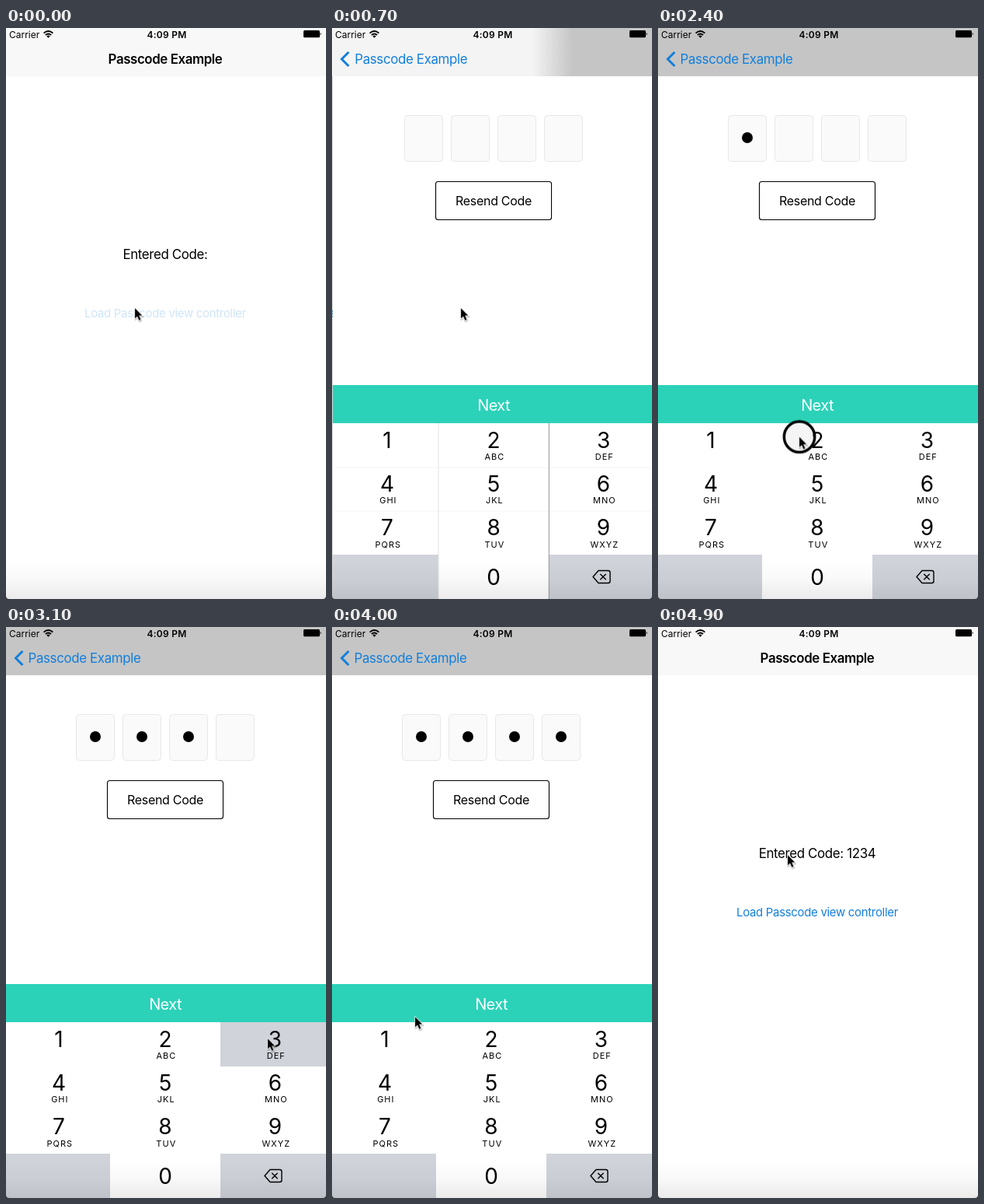
Animation, 412 px wide and 734 px high, one loop 5000 ms. Source, as an HTML page:

```html
<!DOCTYPE html>
<html lang="en">
<head>
<meta charset="utf-8">
<title>Passcode Example</title>
<style>
  html, body { margin: 0; width: 100%; height: 100%; overflow: hidden; background: #fff; }
  svg { display: block; width: 412px; height: 734px; }
  text { font-family: Inter, Roboto, "Liberation Sans", sans-serif; }
  .mid { text-anchor: middle; }
  .body { font-size: 16.9px; letter-spacing: -.36px; }
  .title { font-size: 16.9px; font-weight: 600; letter-spacing: -.42px; }
  .blue { fill: #127fdc; }
  .link { font-size: 14.9px; letter-spacing: -.27px; }
  .num { font-size: 28px; }
  .abc { font-size: 11px; letter-spacing: 1px; }

  /* Push and pop share one eased track */
  .view, .home, .strip, .dim, .old, .oldmove, .new, .newmove {
    animation: 5s cubic-bezier(.16, 1, .3, 1) infinite;
  }
  .view { animation-name: view; }
  .home { animation-name: home; }
  .strip { animation-name: strip; }
  .dim { animation-name: dim; }
  .old { animation-name: fade-out; }
  .oldmove { animation-name: old-move; }
  .new { animation-name: fade-in; }
  .newmove { animation-name: new-move; }
  @keyframes view { 0%, 2.6%, 99.4%, 100% { transform: translateX(422px); } 20.1%, 84.2% { transform: none; } }
  @keyframes home { 0%, 2.6%, 99.4%, 100% { transform: none; } 20.1%, 84.2% { transform: translateX(-123.6px); } }
  @keyframes strip {
    0%, 2.6%, 99.4%, 100% { transform: none; fill: #f8f8f8; }
    20.1%, 84.2% { transform: translateX(-155px); fill: #f4f4f4; }
  }
  @keyframes dim { 0%, 2.6%, 99.4%, 100% { opacity: 0; } 20.1%, 84.2% { opacity: .1; } }
  @keyframes fade-out { 0%, 2.6%, 99.4%, 100% { opacity: 1; } 20.1%, 84.2% { opacity: 0; } }
  @keyframes fade-in { 0%, 2.6%, 99.4%, 100% { opacity: 0; } 20.1%, 84.2% { opacity: 1; } }
  @keyframes old-move { 0%, 2.6%, 99.4%, 100% { transform: none; } 20.1%, 84.2% { transform: translateX(-104.5px); } }
  @keyframes new-move { 0%, 2.6%, 99.4%, 100% { transform: translateX(104.5px); } 20.1%, 84.2% { transform: none; } }

  .press { animation: press 5s linear infinite; }
  @keyframes press { 0%, 2% { opacity: .2; } 7%, 100% { opacity: 1; } }

  /* Hard switches */
  .sw { animation: 5s step-end infinite; }
  .moving { animation-name: moving; }
  .before { animation-name: before; }
  .after { animation-name: after; }
  @keyframes moving { 0%, 84.2%, 100% { opacity: 1; } 16% { opacity: 0; } }
  @keyframes before { 0% { opacity: 1; } 84%, 100% { opacity: 0; } }
  @keyframes after { 0% { opacity: 0; } 84%, 100% { opacity: 1; } }
  .d1 { animation-name: d1; }
  .d2 { animation-name: d2; }
  .d3 { animation-name: d3; }
  .d4 { animation-name: d4; }
  @keyframes d1 { 0% { opacity: 0; } 39.6%, 100% { opacity: 1; } }
  @keyframes d2 { 0% { opacity: 0; } 49.6%, 100% { opacity: 1; } }
  @keyframes d3 { 0% { opacity: 0; } 61.6%, 100% { opacity: 1; } }
  @keyframes d4 { 0% { opacity: 0; } 73.6%, 100% { opacity: 1; } }
  .k1 { animation-name: k1; }
  .k2 { animation-name: k2; }
  .k3 { animation-name: k3; }
  .k4 { animation-name: k4; }
  @keyframes k1 { 0%, 42.4%, 100% { opacity: 0; } 39.6% { opacity: 1; } }
  @keyframes k2 { 0%, 52.8%, 100% { opacity: 0; } 49.6% { opacity: 1; } }
  @keyframes k3 { 0%, 64.4%, 100% { opacity: 0; } 61.6% { opacity: 1; } }
  @keyframes k4 { 0%, 73.6%, 100% { opacity: 0; } 71.6% { opacity: 1; } }
  .ring { animation-name: ring; }
  @keyframes ring {
    0%, 39.6%, 49.6%, 61.6%, 71.6%, 83.6%, 100% { opacity: 0; }
    37.6%, 47.6%, 59.6%, 69.6%, 81.6% { opacity: 1; }
  }

  .cursor { animation: cursor 5s ease-in-out infinite; }
  @keyframes cursor {
    0%, 20% { transform: translate(166px, 360px); }
    31%, 33% { transform: translate(125px, 535px); }
    38%, 41% { transform: translate(120px, 533px); }
    48% { transform: translate(182px, 525.5px); }
    50% { transform: translate(185px, 526px); }
    60% { transform: translate(350px, 530px); }
    62% { transform: translate(337px, 529px); }
    70%, 72% { transform: translate(72px, 605px); }
    80% { transform: translate(107px, 501px); }
    84% { transform: translate(112px, 488px); }
    95%, 100% { transform: translate(167px, 293px); }
  }
</style>
</head>
<body>
<svg viewBox="0 0 412 734">
  <defs>
    <linearGradient id="edge">
      <stop offset="0" stop-color="#f4f4f4"/>
      <stop offset="1" stop-color="#f4f4f4" stop-opacity="0"/>
    </linearGradient>
    <linearGradient id="side">
      <stop offset="0" stop-opacity="0"/>
      <stop offset="1" stop-opacity=".12"/>
    </linearGradient>
    <linearGradient id="foot" x2="0" y2="1">
      <stop offset="0" stop-opacity="0"/>
      <stop offset=".5" stop-opacity=".025"/>
      <stop offset="1" stop-opacity=".08"/>
    </linearGradient>
  </defs>

  <rect width="412" height="734" fill="#fff"/>

  <g class="home">
    <text class="mid body sw before" x="205" y="297">Entered Code:</text>
    <text class="mid body sw after" x="205" y="297">Entered Code: 1234</text>
    <text class="mid link blue press" x="205" y="371.5">Load Passcode view controller</text>
    <rect class="dim" y="62" width="412" height="672"/>
  </g>

  <g class="view">
    <rect x="-10" y="62" width="8" height="672" fill="url(#side)"/>
    <rect x="-2" y="62" width="414" height="672" fill="#fff"/>
    <g id="boxes"></g>
    <rect x="130.5" y="197.5" width="149" height="49" rx="3" fill="#fff" stroke="#000" stroke-width="1.1"/>
    <text class="mid" x="205" y="227.5" font-size="16" letter-spacing="-.3">Resend Code</text>
    <rect x="-2" y="459" width="414" height="49" fill="#2bd2b8"/>
    <text class="mid" x="205" y="491.5" font-size="20" letter-spacing="-.6" fill="#fff">Next</text>

    <g fill="#d0d3da">
      <rect x="-2" y="677" width="136" height="57"/>
      <rect x="276" y="677" width="136" height="57"/>
      <rect class="sw k1" y="508" width="134" height="57"/>
      <rect class="sw k2" x="134" y="508" width="142" height="57"/>
      <rect class="sw k3" x="276" y="508" width="136" height="57"/>
      <rect class="sw k4" y="565" width="134" height="56"/>
    </g>
    <g class="sw moving" fill="none">
      <path d="M0 565H412M0 621H412" stroke="#f4f4f4"/>
      <path d="M134 508V734" stroke="#e2e2e2"/>
      <path d="M276.3 508V734" stroke="#919296"/>
    </g>
    <g id="keys"></g>
    <g fill="none" stroke="#000" stroke-width="1.4" stroke-linejoin="round" stroke-linecap="round">
      <path d="M340 697.5H352.5Q355 697.5 355 700V711Q355 713.5 352.5 713.5H340L333 705.5Z"/>
      <path d="M342.7 702.2L349.3 708.8M349.3 702.2L342.7 708.8"/>
    </g>
  </g>

  <rect width="412" height="62" fill="#c5c5c5"/>
  <g class="sw moving">
    <g class="strip">
      <rect width="412.5" height="62"/>
      <rect x="412" width="52" height="62" fill="url(#edge)"/>
    </g>
  </g>

  <g class="old"><text class="mid title oldmove" x="205" y="46">Passcode Example</text></g>
  <g class="new">
    <path d="M21.5 31L12.5 40L21.5 49" fill="none" stroke="#127fdc" stroke-width="3"/>
    <text class="body blue newmove" x="28.5" y="46">Passcode Example</text>
  </g>

  <text x="4" y="13" font-size="12">Carrier</text>
  <g fill="none" stroke="#000" stroke-width="1.9">
    <path d="M48.6 6.6Q54.5 1.4 60.4 6.6"/>
    <path d="M50.9 9Q54.5 5.9 58.1 9"/>
  </g>
  <path d="M52.3 10.4Q54.5 8.7 56.7 10.4L54.5 12.8Z"/>
  <text class="mid" x="207" y="13" font-size="12" font-weight="600" letter-spacing=".25">4:09 PM</text>
  <rect x="383" y="3" width="21" height="9.3" rx="1.6"/>
  <path d="M404.7 6Q406.7 7.7 404.7 9.4Z"/>

  <rect y="684" width="412" height="50" fill="url(#foot)"/>
  <path d="M0 729.5Q0 734 4.5 734H0ZM412 729.5Q412 734 407.5 734H412Z" fill="#333"/>

  <g class="cursor">
    <circle class="sw ring" r="19.7" fill="#eee" fill-opacity=".6" stroke="#000" stroke-width="3.5"/>
    <g stroke-linejoin="round" transform="scale(.9)">
      <path d="M.6 1.5V16.5L4 13.6L6.6 19.3L9.2 18L6.6 12.6H11.4Z" opacity=".18" stroke="#000" stroke-width="2.6"/>
      <path d="M0 0V14.8L3.4 11.7L6 17.5L8.3 16.4L5.8 10.8H10.3Z" stroke="#fff" stroke-width="1.6" paint-order="stroke"/>
    </g>
  </g>
</svg>
<script>
  const cols = [68, 205, 346.5];
  const letters = ["", "ABC", "DEF", "GHI", "JKL", "MNO", "PQRS", "TUV", "WXYZ"];
  const digit = (x, y, n) => `<text class="mid num" x="${x}" y="${y}">${n}</text>`;

  document.getElementById("keys").innerHTML = letters.map((abc, i) => {
    const x = cols[i % 3], y = 539.5 + 56.3 * Math.floor(i / 3);
    return digit(x, y, i + 1) + `<text class="mid abc" x="${x + 1.3}" y="${y + 15.5}">${abc}</text>`;
  }).join("") + digit(205, 715.5, 0);

  document.getElementById("boxes").innerHTML = [1, 2, 3, 4].map(n => {
    const x = 30 + 60 * n;
    return `<rect x="${x + .5}" y="112.5" width="49" height="59" rx="4" fill="#fafafa" stroke="#e2e2e2" stroke-width=".8"/>
      <circle class="sw d${n}" cx="${x + 25}" cy="141" r="7"/>`;
  }).join("");
</script>
</body>
</html>
```
